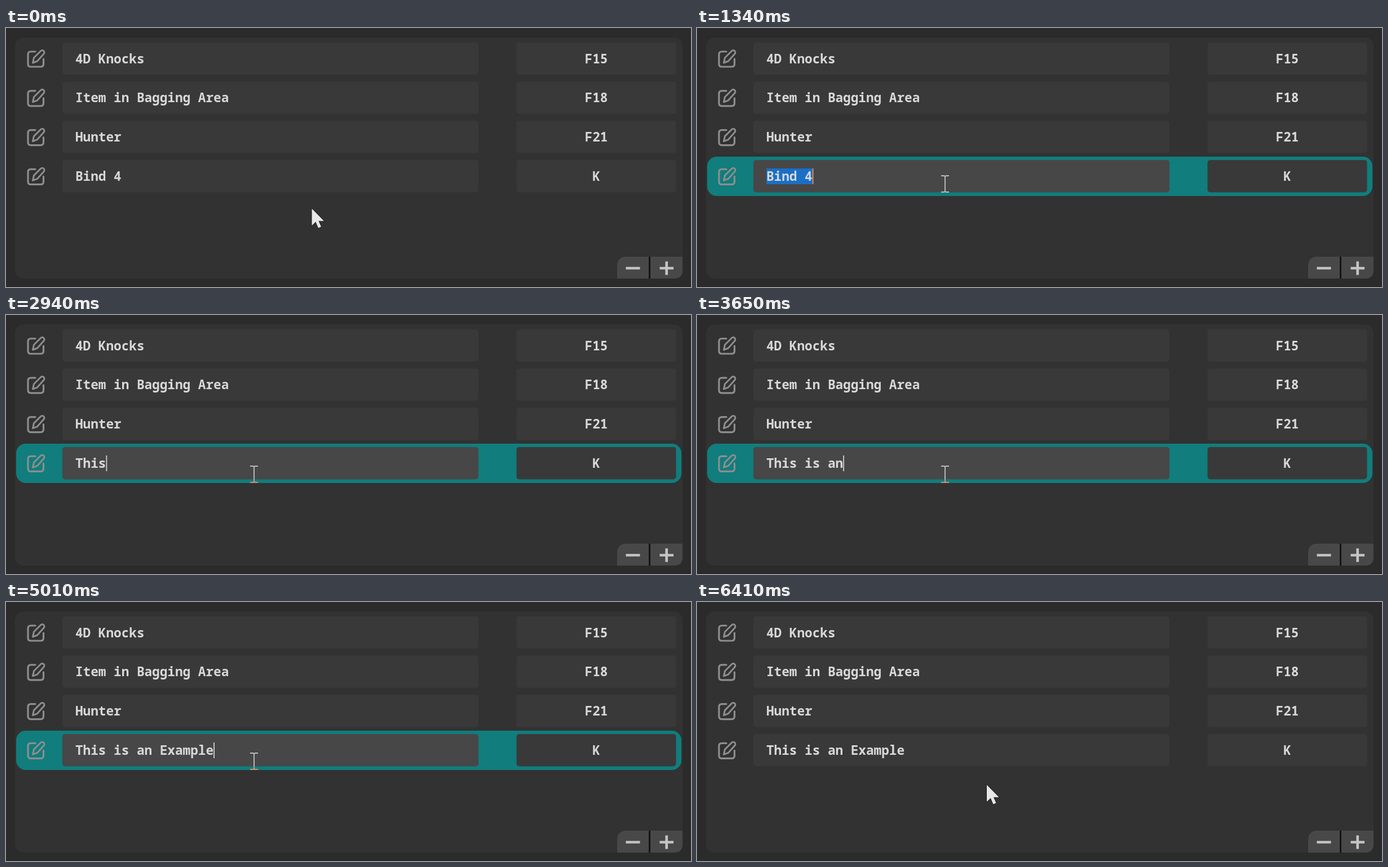
Recreate the animation shown at these times as an HTML page. Size 1215 px wide and 461 px high, loop 6800 ms.

```html
<!DOCTYPE html>
<html lang="en">
<head>
<meta charset="utf-8">
<title>Key binds</title>
<style>
html, body { margin: 0; width: 100%; height: 100%; overflow: hidden; background: #2b2b2b; }
svg { display: block; width: 1215px; height: 461px; }
text { font: 600 22.7px "Noto Sans Mono", "DejaVu Sans Mono", monospace; fill: #d8d8d8; white-space: pre; }
</style>
</head>
<body>
<svg viewBox="0 0 1215 461">
  <defs>
    <g id="edit" fill="none" stroke="#8e8e8e" stroke-linecap="round" stroke-linejoin="round">
      <path d="M52 -12H44Q39 -12 39 -7V10Q39 15 44 15H61.5Q66.5 15 66.5 10V1" stroke-width="3.2"/>
      <path d="M47.5 8L49.5 -1L61.5 -13A3.6 3.6 0 0 1 67 -8L55.5 5Z" stroke-width="3"/>
    </g>
    <path id="beamShape" d="M-7 -14.5H-2.5Q0 -14.5 0 -12.5Q0 -14.5 2.5 -14.5H7M0 -13V13M-7 14.5H-2.5Q0 14.5 0 12.5Q0 14.5 2.5 14.5H7" fill="none" stroke-width="1.9"/>
    <clipPath id="below"><rect x="100" y="293" width="738" height="20"/></clipPath>
  </defs>
  <rect width="1215" height="461" fill="#2b2b2b"/>
  <rect y="460" width="1215" height="1" fill="#222"/>
  <rect x="16" y="17" width="1184" height="429" rx="15" fill="#323232"/>
  <rect id="glow" x="18" y="229" width="1180" height="70" rx="17" fill="#117d7d"/>
  <g id="rows"></g>
  <rect id="mark" x="123" y="250" width="82" height="28" fill="#1a6fc6"/>
  <text id="name" x="123" y="272"></text>
  <rect id="caret" y="250" width="1.8" height="28"/>
  <path d="M1084 446V424Q1084 407 1101 407H1140V446Z" fill="#484848"/>
  <path d="M1143 407H1200V431Q1200 446 1185 446H1143Z" fill="#484848"/>
  <rect x="1140" y="407" width="3" height="39" fill="#141414"/>
  <path d="M1099.5 427.5H1124.5M1159.5 427.5H1184M1171.7 415.5V439.5" stroke="#c4c4c4" stroke-width="4.6"/>
  <path id="arrow" d="M0 0V30L6.8 23.5L11.5 34.5L16.5 32.3L12 22H21.5Z" fill="#e8e8e8" stroke="#222" stroke-width="2" paint-order="stroke"/>
  <use id="beam" href="#beamShape" stroke="#bcbcbc"/>
  <g id="tint" clip-path="url(#below)"><use id="beamTint" href="#beamShape" stroke="#d08c78"/></g>
</svg>
<script>
const LOOP = 6800, LEFT = 123, ADVANCE = 13.62, BLINK = 530;
const CLICK = 820, SELECT = 1090, BLUR = 6410;
const PHRASE = "This is an Example";
const TYPED = [2340, 2470, 2610, 2800, 3030, 3140, 3270, 3440, 3530,
  3650, 3840, 4110, 4240, 4340, 4450, 4650, 4770, 4940];
// time, x, y of the pointer's hot spot
const PATH = [[30, 542.5, 321.5], [370, 450, 285], [720, 440, 277.5], [1340, 440, 277.5],
  [1480, 440, 283.5], [5620, 440, 283.5], [5690, 447, 283.5], [5830, 436, 283.5],
  [5990, 436, 283.5], [6190, 514, 325.5]];
const $ = id => document.getElementById(id);
const show = (id, on) => $(id).setAttribute("visibility", on ? "visible" : "hidden");
const set = (id, attr, value) => $(id).setAttribute(attr, value);

const labels = [["4D Knocks", "F15"], ["Item in Bagging Area", "F18"], ["Hunter", "F21"], ["", "K"]];
$("rows").innerHTML = labels.map(([label, key], i) => {
  const y = 25.5 + i * 69.8;
  return `<use href="#edit" y="${y + 28.5}"/>
    <rect id="field${i}" x="100" y="${y}" width="738" height="57.5" rx="5" fill="#393939"/>
    <rect x="905.5" y="${y}" width="283" height="57.5" rx="5" fill="#393939"/>
    <text x="${LEFT}" y="${y + 37}">${label}</text>
    <text x="1047" y="${y + 37}" text-anchor="middle">${key}</text>`;
}).join("");

// The pointer is sampled every 70 ms.
function pointer(time) {
  const t = Math.floor((time - 20) / 70) * 70 + 20;
  const next = PATH.findIndex(p => p[0] > t);
  if (next === 0) return PATH[0].slice(1);
  if (next < 0) return PATH[PATH.length - 1].slice(1);
  const a = PATH[next - 1], b = PATH[next];
  const k = (t - a[0]) / (b[0] - a[0]);
  return [a[1] + (b[1] - a[1]) * k, a[2] + (b[2] - a[2]) * k];
}

function draw(t) {
  const [x, y] = pointer(t);
  const hover = y < 299;
  const place = `translate(${x} ${y})`;
  show("glow", hover);
  set("field3", "fill", hover ? "#474747" : "#393939");
  show("arrow", !hover);
  show("beam", hover);
  show("tint", hover && t > 720);
  for (const id of ["arrow", "beam", "beamTint"]) set(id, "transform", place);

  const count = TYPED.filter(at => at <= t).length;
  const text = count ? PHRASE.slice(0, count) : "Bind 4";
  const selected = t >= SELECT && !count;
  $("name").textContent = text;
  show("mark", selected);

  const reset = count ? TYPED[count - 1] : selected ? SELECT : CLICK;
  const lit = Math.floor((t - reset) / BLINK) % 2 === 0;
  show("caret", t >= CLICK && t < BLUR && lit);
  set("caret", "x", LEFT + text.length * ADVANCE);
  set("caret", "fill", selected ? "#e58e55" : "#d0d0d0");
}

const start = performance.now();
function tick() {
  draw((performance.now() - start) % LOOP);
  requestAnimationFrame(tick);
}
draw(0);
requestAnimationFrame(tick);
</script>
</body>
</html>
```
